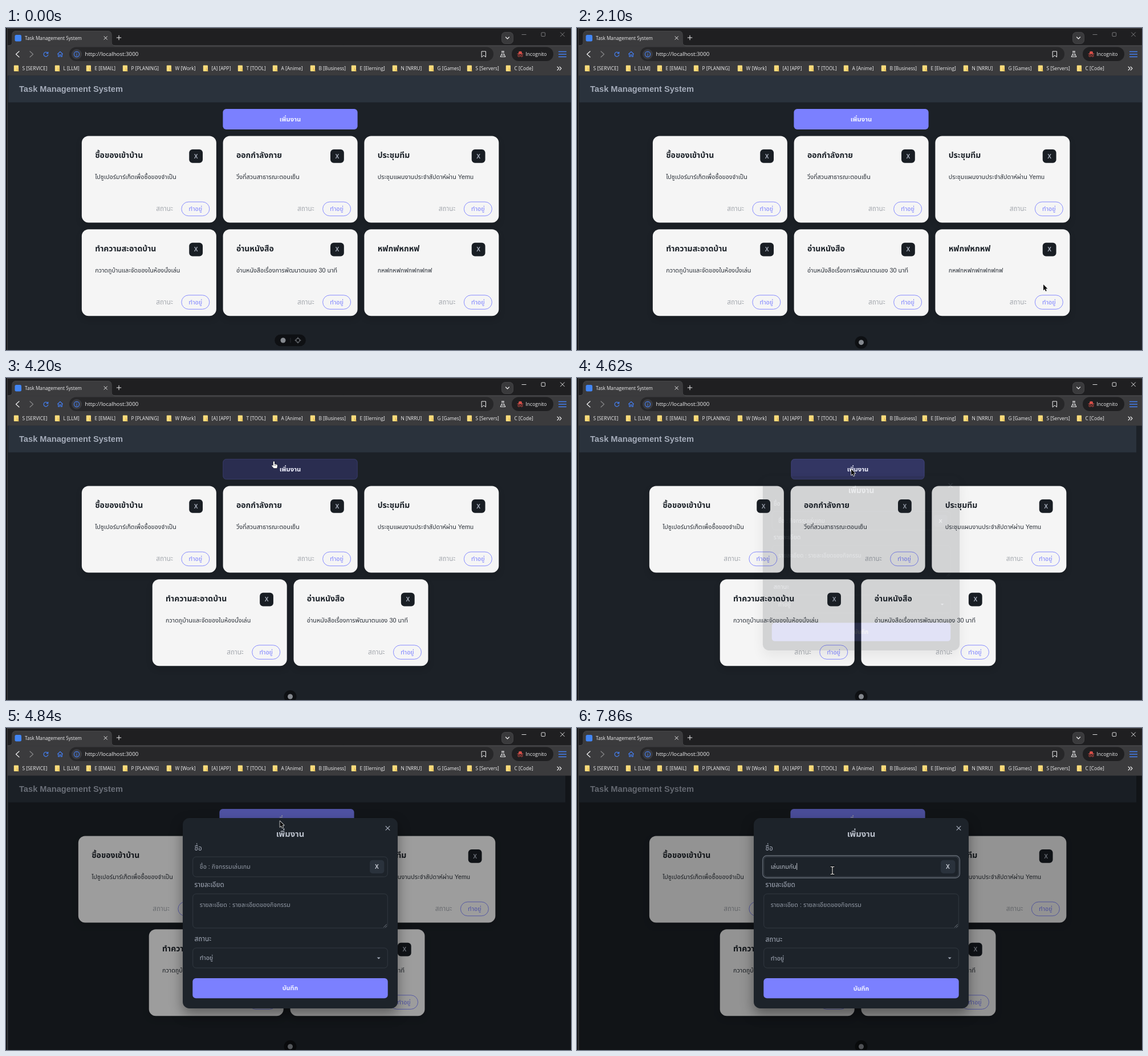
An HTML page with a canvas for the animation above (8 s loop, 991 by 565 pixels).

```html
<!DOCTYPE html>
<html lang="th">
<head>
<meta charset="utf-8">
<title>Task Management System</title>
<style>
html, body { margin: 0; width: 100%; height: 100%; overflow: hidden; background: #1d232a; }
canvas { display: block; width: 991px; height: 565px; }
</style>
</head>
<body>
<canvas id="stage"></canvas>
<script>
const W = 991, H = 565, LOOP = 8000;
const BASE = '#1c2127', BAR = '#2a323c', PRIMARY = '#7b80ff', MUTED = '#a6adbb';
const BODY = '"Liberation Sans", "Noto Sans Thai Looped", "Noto Sans Thai", "Noto Sans", sans-serif';
const CHROME = '"Open Sans", "Noto Sans", sans-serif';
const SMALL = 10.8, LABEL = 11.7;

const dpr = window.devicePixelRatio || 1;
function makeLayer(canvas) {
  canvas.width = W * dpr;
  canvas.height = H * dpr;
  return canvas.getContext('2d');
}
const stage = makeLayer(document.getElementById('stage'));
const sheet = makeLayer(document.createElement('canvas'));
let c = stage;

// ---- helpers ----
const clamp = v => Math.max(0, Math.min(1, v));
const span = (t, a, b) => clamp((t - a) / (b - a));
const smooth = p => p * p * (3 - 2 * p);
const easeOut = p => 1 - (1 - p) * (1 - p);
const lerp = (a, b, p) => a + (b - a) * p;
const mix = (a, b, p) => `rgb(${a.map((v, i) => Math.round(lerp(v, b[i], p)))})`;

function box(x, y, w, h, r, fill, line, width = 0.8) {
  c.beginPath();
  c.roundRect(x, y, w, h, r);
  if (fill) { c.fillStyle = fill; c.fill(); }
  if (line) { c.strokeStyle = line; c.lineWidth = width; c.stroke(); }
}
function dot(x, y, r, fill, line, width = 1) {
  box(x - r, y - r, 2 * r, 2 * r, r, fill, line, width);
}
function path(d, x, y, fill, line, width = 1) {
  const p = new Path2D(d);
  c.save();
  c.translate(x, y);
  c.lineJoin = c.lineCap = 'round';
  if (line) { c.strokeStyle = line; c.lineWidth = width; c.stroke(p); }
  if (fill) { c.fillStyle = fill; c.fill(p); }
  c.restore();
}
function text(s, x, y, size, color, weight = 400, align = 'left', family = BODY) {
  c.font = `${weight} ${size}px ${family}`;
  c.fillStyle = color;
  c.textAlign = align;
  c.fillText(s, x, y);
}
function shadow(color, blur, dy) {
  c.shadowColor = color;
  c.shadowBlur = blur * dpr;
  c.shadowOffsetY = dy * dpr;
}

// ---- browser window ----
const marks = [
  [13, 'S [SERVICE]'], [85, 'L [LLM]'], [140, 'E [EMAIL]'], [204, 'P [PLANING]'], [281, 'W [Work]'],
  [345, '[A] [APP]'], [406, 'T [TOOL]'], [467, 'A [Anime]'], [533, 'B [Business]'], [605, 'E [Elerning]'],
  [677, 'N [NRRU]'], [741, 'G [Games]'], [808, 'S [Servers]'], [876, 'C [Code]']
];

function drawBrowser(active) {
  const ui = '#efeff0', blue = '#4480f5', tool = '#3b3b3d', red = '#e0524a';
  c.fillStyle = '#1f1f21';
  c.fillRect(0, 0, W, 32);
  c.fillStyle = tool;
  c.fillRect(2, 31, W, 52.5);
  c.fillStyle = '#434345';
  c.fillRect(2, 0, W, 1);

  path('M2 31 H4 Q11 31 11 25 V12 Q11 5.5 18 5.5 H178 Q185 5.5 185 12 V25 Q185 31 192 31 H991',
    0, 0, tool, '#606164', 0.8);
  c.fillStyle = tool;
  c.fillRect(8, 30.4, 180, 2);
  box(15.5, 12, 11.5, 11.5, 2.5, '#4285f4');
  text('Task Management System', 33, 21.3, 8.25, ui, 400, 'left', CHROME);
  path('M-2.7 -2.7 L2.7 2.7 M2.7 -2.7 L-2.7 2.7', 174.7, 17.5, null, ui);
  path('M-3.8 0 H3.8 M0 -3.8 V3.8', 198, 17, null, ui);

  box(869.5, 7.5, 20, 20, 6, '#3a3a3c', '#4c4c4f');
  path('M-3 -1.5 L0 1.5 L3 -1.5', 879.5, 17.5, null, ui, 1.2);
  const win = active ? '#f4f4f4' : '#858587';
  path('M-3.6 0 H3.6', 908.5, 11.5, null, win, 0.9);
  box(939, 8, 6.6, 6.6, 1, null, win, 0.9);
  path('M-3.5 -3.5 L3.5 3.5 M3.5 -3.5 L-3.5 3.5', 976, 11.3, null, win, 0.9);

  path('M3 -5 L-2.5 0 L3 5', 20, 46, null, ui, 1.2);
  path('M-3 -5 L2.5 0 L-3 5', 45, 46, null, '#858587', 1.2);
  path('M3.4 -1.8 A3.9 3.9 0 1 0 3.8 1.2 M3.8 -4 V-1.4 H1', 70, 46, null, blue, 1.2);
  path('M-4.4 -0.3 L0 -4.5 L4.4 -0.3 M-3.3 -1 V4.3 H-1.2 V1 H1.2 V4.3 H3.3 V-1', 95, 46, null, blue, 1.1);

  box(111, 33.5, 744, 24.5, 12, '#272729');
  dot(124, 46, 9, '#3a3b40');
  dot(124, 46, 4.6, null, blue, 1.1);
  path('M0 -2.2 V-2 M0 0 V2.3', 124, 46, null, blue, 1.1);
  text('http://localhost:3000', 138.5, 49.2, 9.7, ui, 400, 'left', CHROME);
  path('M-3.5 -5 H3.5 V5 L0 2 L-3.5 5 Z', 838, 46, null, ui, 1);
  path('M-2 -5 H2 M-1.3 -5 V-1.5 L-4.5 4.5 H4.5 L1.3 -1.5 V-5 M-2.6 1.5 H2.6', 871.5, 46, null, ui, 1);

  box(887, 33.5, 73, 24.5, 12, '#1f1f21');
  path('M-5 -0.6 H5 M-2.8 -1.2 L-2 -4.6 H2 L2.8 -1.2 Z', 902, 46, red, red, 0.9);
  dot(899.6, 48.7, 1.7, null, red, 0.9);
  dot(904.4, 48.7, 1.7, null, red, 0.9);
  text('Incognito', 911.5, 49, 8.5, ui, 500, 'left', CHROME);
  path('M-6.5 -4.5 H6.5 M-6.5 0 H6.5 M-6.5 4.5 H6.5', 976, 46, null, blue, 1.3);

  for (const [x, label] of marks) {
    box(x + 0.8, 65.5, 8.2, 10.5, 1, '#fbdc7c');
    path('M0 0 V4 H2.5 V6', x + 6.5, 70, null, '#d9a93a', 0.8);
    text(label, x + 15.5, 74, 8.4, ui, 400, 'left', CHROME);
  }
  path('M-3 -3 L0 0 L-3 3 M1 -3 L4 0 L1 3', 970, 71, null, ui, 1.1);
}

// ---- page ----
const tasks = [
  ['ซื้อของเข้าบ้าน', 'ไปซูเปอร์มาร์เก็ตเพื่อซื้อของจำเป็น'],
  ['ออกกำลังกาย', 'วิ่งที่สวนสาธารณะตอนเย็น'],
  ['ประชุมทีม', 'ประชุมแผนงานประจำสัปดาห์ผ่าน Yemu'],
  ['ทำความสะอาดบ้าน', 'กวาดถูบ้านและจัดของในห้องนั่งเล่น'],
  ['อ่านหนังสือ', 'อ่านหนังสือเรื่องการพัฒนาตนเอง 30 นาที'],
  ['หฟกฟหกหฟ', 'กหฟกหฟกฟกฟกฟกฟ']
];

function drawCard(x, y, [title, note], closeHover, pillHover) {
  c.save();
  shadow('rgba(0,0,0,.16)', 12, 5);
  box(x, y, 236, 152, 12, '#f5f5f5');
  c.restore();
  text(title, x + 23.3, y + 38.2, 14, '#1d232a', 600);
  box(x + 188.4, y + 23.4, 23.8, 23.8, 5.8, mix([25, 30, 36], [255, 88, 97], closeHover));
  text('X', x + 200.3, y + 39, 10.2, MUTED, 700, 'center');
  text(note, x + 23.3, y + 75.8, SMALL, '#2a3038');
  text('สถานะ', x + 130.5, y + 131.2, LABEL, '#a3a7ad');
  box(x + 175, y + 115.5, 49, 24.6, 12.3, pillHover ? PRIMARY : null, PRIMARY, 0.9);
  text('ทำอยู่', x + 199.5, y + 131.2, SMALL, pillHover ? '#fff' : PRIMARY, 400, 'center');
}

function drawPage(t) {
  const open = t >= 4600, shift = open ? -6 : 0;
  const count = t < 3590 ? 6 : 5;
  c.fillStyle = BASE;
  c.fillRect(0, 83.5, W, H);
  c.fillStyle = BAR;
  c.fillRect(4, 83.5, (open ? 981 : W) - 4, 47);
  text('Task Management System', 23, 111.8, 14.65, MUTED, 700);

  const hover = t < 4600 ? span(t, 4080, 4200) : 1 - span(t, 4600, 4780);
  const press = t >= 4520 && t < 4760 ? 0.99 : 1;
  const w = 236.2 * press;
  box(498.5 + shift - w / 2, 142, w, 36, 5.8, mix([123, 128, 255], [42, 45, 80], hover));
  if (hover) box(498.9 + shift - w / 2, 142.4, w - 0.8, 35.2, 5.8, null, mix([123, 128, 255], [58, 62, 108], hover));
  text('เพิ่มงาน', 498.5 + shift, 163.7, 11.2, '#f1f2ff', 700, 'center');

  const pill = t >= 1830 && t < 1980;
  for (let i = 0; i < count; i++) {
    const row = Math.floor(i / 3), inRow = Math.min(3, count - row * 3);
    const x = 498.6 - (inRow * 247.75 - 11.75) / 2 + (i % 3) * 247.75 + shift;
    drawCard(x, 189.6 + row * 163.7, tasks[i], i === 5 ? span(t, 2480, 2650) : 0, i === 5 && pill);
  }

  // floating dev panel: shrinks to a dot, then sinks
  const s = smooth(span(t, 1700, 2060)), sink = smooth(span(t, 1850, 2500));
  const half = lerp(27.3, 11, s), cy = lerp(548, 559, sink), ry = lerp(10.3, 11, s);
  box(498.5 - half, cy - ry, half * 2, ry * 2, ry, '#0e1013');
  dot(lerp(486, 498.5, s), cy, 4.5, '#85898f');
  if (s < 0.5) {
    c.globalAlpha = 1 - 2 * s;
    path('M0 -4 V4', 499, cy, null, '#2c3036', 0.8);
    dot(512, cy, 3.6, null, '#85898f', 0.9);
    path('M0 -5.2 V-2.4 M0 2.4 V5.2 M-5.2 0 H-2.4 M2.4 0 H5.2', 512, cy, null, '#85898f', 0.9);
    c.globalAlpha = 1;
  }
}

// ---- dialog ----
const word = 'เล่นเกมกัน';
const keys = [6200, 6330, 6530, 6660, 6860, 6930, 7190, 7390, 7590, 7860];
const FOCUS = 5390;

function drawDialog(t) {
  const edge = '#383f48', hint = '#9299a5';
  c.save();
  shadow('rgba(0,0,0,.4)', 22, 10);
  box(310, 158, 377, 334, 11.6, '#1d232a');
  c.restore();
  text('เพิ่มงาน', 498.5, 190.5, 14.8, '#b9bfca', 700, 'center');
  path('M-3.4 -3.4 L3.4 3.4 M3.4 -3.4 L-3.4 3.4', 669.5, 175.7, null, MUTED, 1.2);

  text('ชื่อ', 330.5, 214.5, LABEL, MUTED);
  const focused = t >= FOCUS;
  if (focused) box(325.6, 224, 345.8, 39, 7.5, null, '#646b76', 1.3);
  box(327.7, 226, 341.6, 35, 5.8, null, focused ? '#4b525c' : edge);
  const typed = word.slice(0, keys.filter(k => t >= k).length);
  text(typed || 'ชื่อ : กิจกรรมเล่นเกม', 339.7, 247, SMALL, typed ? '#b4bac5' : hint);
  if (focused && (t < 5870 || typed)) {
    const end = 340 + (typed ? c.measureText(typed).width : 0);
    c.fillStyle = '#d5d9e0';
    c.fillRect(end, 237, 0.9, 12);
  }
  box(638, 231.8, 25.4, 23.4, 5, BAR);
  text('X', 650.5, 247.2, 10.2, '#c3c8d1', 700, 'center');

  text('รายละเอียด', 330.5, 279, LABEL, MUTED);
  box(327.7, 291, 341.6, 60, 5.8, null, edge);
  text('รายละเอียด : รายละเอียดของกิจกรรม', 339.7, 314, SMALL, hint);
  path('M0 5 L5 0 M3 5 L5 3', 662.5, 344.5, null, '#868c96', 0.8);

  text('สถานะ', 330.5, 374.5, LABEL, MUTED);
  box(327.7, 386, 341.6, 35, 5.8, null, edge);
  text('ทำอยู่', 339.7, 407.5, SMALL, MUTED);
  path('M-3 -1.4 H3 L0 1.6 Z', 653.7, 404, MUTED);

  box(327.3, 439, 342.4, 35.3, 5.8, PRIMARY);
  text('บันทึก', 498.5, 460.5, SMALL, '#f1f2ff', 700, 'center');
}

function drawOverlay(t) {
  if (t < 4600) return;
  c.fillStyle = `rgba(0,0,0,${0.4 * easeOut(span(t, 4620, 4940))})`;
  c.fillRect(4, 83.5, W, H);
  const p = easeOut(span(t, 4600, 4845)), k = 0.9 + 0.1 * p;
  c = sheet;
  c.setTransform(1, 0, 0, 1, 0, 0);
  c.clearRect(0, 0, W * dpr, H * dpr);
  c.setTransform(dpr * k, 0, 0, dpr * k, 498.5 * (1 - k) * dpr, 325 * (1 - k) * dpr);
  drawDialog(t);
  c = stage;
  c.globalAlpha = p;
  c.drawImage(sheet.canvas, 0, 0, W, H);
  c.globalAlpha = 1;
}

// ---- pointer: [start, end, points along the way] ----
const moves = [
  [460, 1290, [[950, 562], [800, 470], [560, 345], [422, 322], [488, 346]]],
  [1290, 2060, [[488, 346], [432, 326], [600, 440], [830, 486], [818, 450]]],
  [2100, 2650, [[818, 450], [824, 415], [828.5, 389]]],
  [3920, 4200, [[828.5, 389], [640, 260], [470, 146]]],
  [4200, 4500, [[470, 146], [474, 155], [481, 160]]],
  [4760, 5360, [[481, 160], [470, 215], [448, 250]]]
];
const clicks = [[3450, 3590], [4500, 4600]];
const hands = [[1830, 1980], [2480, 3590], [4080, 4600]];
const during = (list, t) => list.some(([a, b]) => t >= a && t < b);
const BEAM = 'M-3 -6.5 H-1 L0 -5.8 L1 -6.5 H3 M0 -5.8 V5.8 M-3 6.5 H-1 L0 5.8 L1 6.5 H3';

function curve(pts, p) {
  const n = pts.length - 1, i = Math.min(n - 1, Math.floor(p * n)), u = p * n - i;
  const at = j => pts[Math.max(0, Math.min(n, j))];
  return [0, 1].map(k => {
    const [a, b, d, e] = [at(i - 1)[k], at(i)[k], at(i + 1)[k], at(i + 2)[k]];
    return b + u * (d - a + u * (2 * a - 5 * b + 4 * d - e + u * (3 * (b - d) + e - a))) / 2;
  });
}

function drawPointer(t) {
  if (t < 460) return;
  const [a, b, pts] = moves.filter(m => t >= m[0]).pop();
  const [x, y] = curve(pts, smooth(span(t, a, b)));
  if (during(clicks, t)) dot(x, y, 9, 'rgba(255,166,30,.92)');
  if (during(hands, t)) {
    path('M-1.2 1 Q0 -0.6 1 1 V5 L4.5 5.7 Q6.3 6.2 6 8.2 L5.2 12.2 H-0.3 L-3.6 8.4 Q-4 6.6 -2.4 7.2 L-1.2 8 Z',
      x, y, '#fff', '#111', 1);
    path('M1.2 6 V8 M3 6.3 V8', x, y, null, '#333', 0.6);
  } else if (t >= 5250) {
    path(BEAM, x, y, null, '#000', 2.6);
    path(BEAM, x, y, null, '#fff', 1.1);
  } else {
    path('M0 0 V10.5 L2.4 8.3 L4 12 L5.7 11.3 L4.2 7.6 H7.4 Z', x, y, '#0b0b0b', '#fff', 1.4);
  }
}

function frame(now) {
  const t = now % LOOP;
  c = stage;
  c.setTransform(dpr, 0, 0, dpr, 0, 0);
  drawPage(t);
  drawOverlay(t);
  drawBrowser(t >= 3520);
  c.fillStyle = '#121315';
  c.fillRect(0, 0, 2, H);
  c.fillStyle = '#434345';
  c.fillRect(2, 0, 1, H);
  drawPointer(t);
}

let start;
function tick(now) {
  start ??= now;
  frame(now - start);
  requestAnimationFrame(tick);
}
requestAnimationFrame(tick);
</script>
</body>
</html>
```
